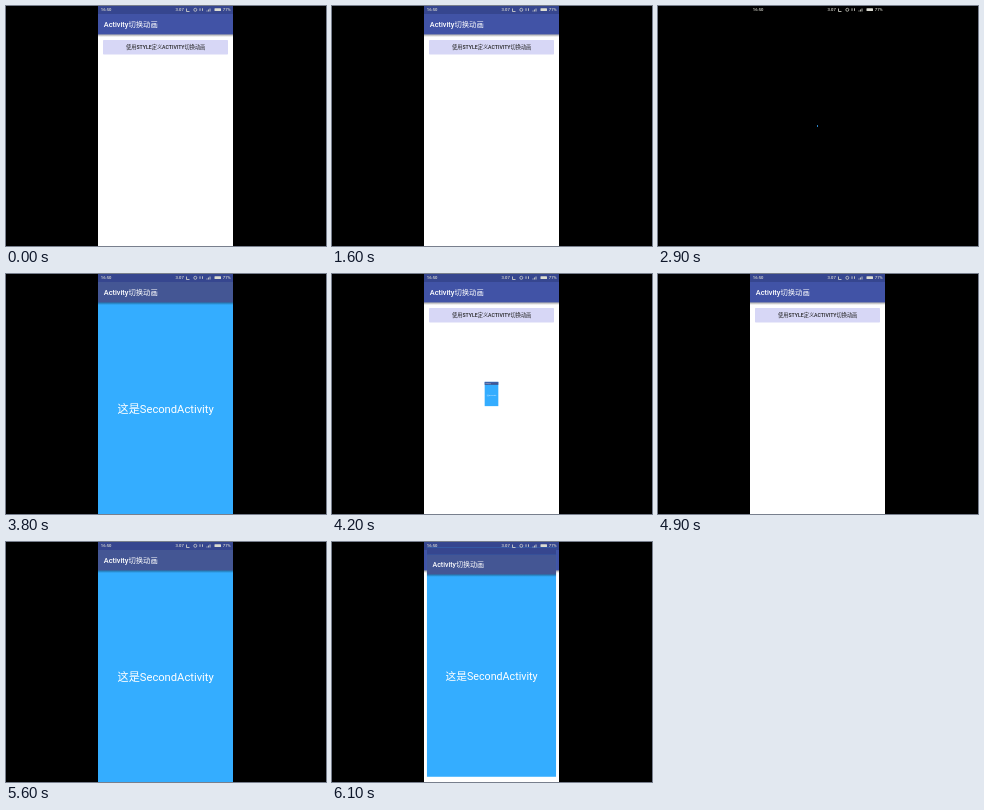
An HTML page for the animation above (6200 ms loop, 320 by 240 pixels).

```html
<!DOCTYPE html>
<html lang="zh">
<head>
<meta charset="utf-8">
<title>Activity切换动画</title>
<style>
  html, body { margin: 0; width: 100%; height: 100%; overflow: hidden; background: #000; }
  svg { display: block; width: 100vw; height: 100vh; }
  text { font-family: Roboto, "Noto Sans CJK SC", "Noto Sans CJK", sans-serif; }
  .title { font-size: 7.35px; font-weight: 500; fill: #fff; }
  .label { font-size: 5.2px; font-weight: 500; fill: #222; text-anchor: middle; }
  .hello { font-size: 11.2px; fill: #fff; text-anchor: middle; }
  .status { font-size: 4.2px; font-weight: 500; fill: #dcdcd2; }
</style>
</head>
<body>
<svg viewBox="0 0 320 240">
  <defs>
    <linearGradient id="shade" x2="0" y2="1">
      <stop offset="0" stop-color="#000" stop-opacity=".35"/>
      <stop offset="1" stop-color="#000" stop-opacity="0"/>
    </linearGradient>
    <clipPath id="screen"><rect x="92" width="135" height="240"/></clipPath>
  </defs>
  <rect width="320" height="240" fill="#000"/>
  <g clip-path="url(#screen)">
    <g id="main">
      <rect x="92" width="135" height="240" fill="#fff"/>
      <rect x="92" width="135" height="8" fill="#36468f"/>
      <rect x="92" y="8" width="135" height="20.5" fill="#4153a6"/>
      <rect x="92" y="28.5" width="135" height="2.5" fill="url(#shade)"/>
      <text class="title" x="97.8" y="20.8">Activity切换动画</text>
      <rect x="97" y="34" width="125" height="14.5" rx=".7" fill="#d7d7f6"/>
      <text class="label" x="159.7" y="43.2">使用STYLE定义ACTIVITY切换动画</text>
    </g>
    <g id="second">
      <rect x="92" width="135" height="240" fill="#34adff"/>
      <rect x="92" width="135" height="8" fill="#36468f"/>
      <rect x="92" y="8" width="135" height="20.5" fill="#445694"/>
      <rect x="92" y="28.5" width="135" height="2.5" fill="url(#shade)"/>
      <text class="title" x="97.8" y="20.8">Activity切换动画</text>
      <text class="hello" x="159.6" y="138.6">这是SecondActivity</text>
    </g>
  </g>
  <g class="status">
    <text x="94.8" y="5.3">16:50</text>
    <text x="169.5" y="5.3">3.07</text>
    <path d="M180.5 2.5v3h3M194 2.3v2.6M196.5 2.3v2.6M201 5.5v-1M202.5 5.5v-2M204 5.5v-3" fill="none" stroke="#dcdcd2" stroke-width=".8"/>
    <circle cx="189.3" cy="3.8" r="1.5" fill="none" stroke="#dcdcd2" stroke-width=".7"/>
    <rect x="208.5" y="2.3" width="6.5" height="2.6" rx=".5"/>
    <text x="216.8" y="5.3">77%</text>
  </g>
</svg>
<script>
  const LOOP = 6200, STEP = 100;
  const OPEN = 300, CLOSE = 500;
  // The second screen grows over black and shrinks over the main screen.
  const VISITS = [
    { open: 2884, close: 3803 },
    { open: 4923, close: 6033 }
  ];
  const main = document.getElementById("main");
  const second = document.getElementById("second");

  function ease(p) {
    return (1 - Math.cos(Math.PI * Math.min(1, Math.max(0, p)))) / 2;
  }

  function render(t) {
    const visit = VISITS.find(v => t >= v.open && t < v.close + CLOSE);
    const closing = visit && t >= visit.close;
    main.style.display = !visit || closing ? "" : "none";
    second.style.display = visit ? "" : "none";
    if (!visit) return;
    const k = closing
      ? 1 - ease((t - visit.close) / CLOSE)
      : ease((t - visit.open) / OPEN);
    second.setAttribute("transform", `translate(159.5 120) scale(${k}) translate(-159.5 -120)`);
  }

  const begin = performance.now();
  function draw() {
    const t = Math.max(0, performance.now() - begin) % LOOP;
    render(Math.floor(t / STEP) * STEP);
    requestAnimationFrame(draw);
  }
  draw();
</script>
</body>
</html>
```
